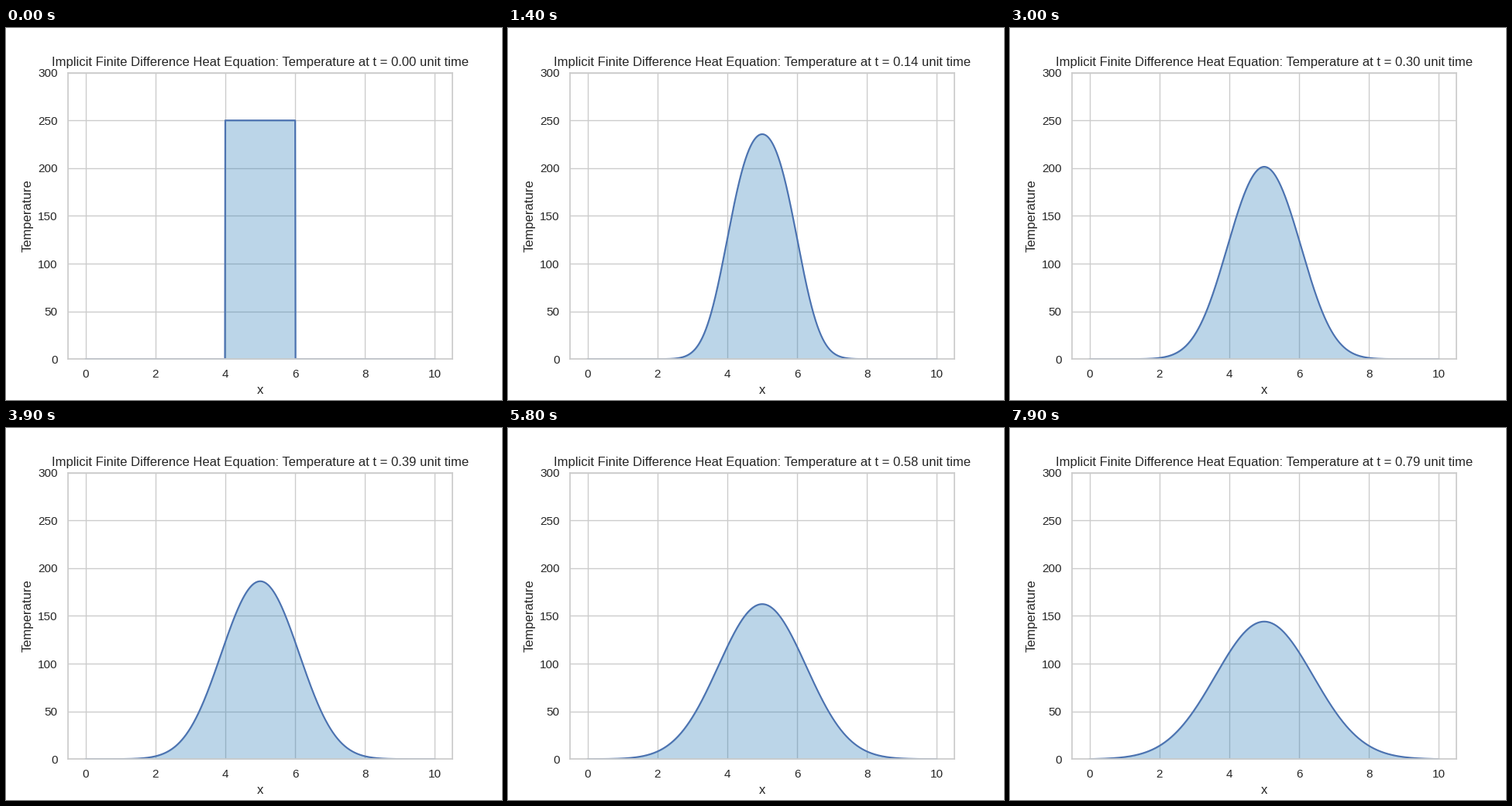
Recreate the animation shown at these times as a matplotlib script. Size 640 px wide and 480 px high, loop 8000 ms.

```python
import numpy as np
import matplotlib.pyplot as plt
from matplotlib.animation import FuncAnimation

INK, GRID = ".15", ".8"
plt.rcParams.update({
    "font.family": "sans-serif",
    "font.sans-serif": ["Liberation Sans", "DejaVu Sans"],
    "font.size": 12, "axes.titlesize": 12, "axes.labelsize": 12,
    "xtick.labelsize": 11, "ytick.labelsize": 11,
    "text.color": INK, "axes.labelcolor": INK,
    "xtick.color": INK, "ytick.color": INK,
    "axes.edgecolor": GRID, "axes.linewidth": 1.25, "axes.axisbelow": True,
    "axes.grid": True, "grid.color": GRID, "grid.linewidth": 1,
    "xtick.bottom": False, "ytick.left": False,
    "xtick.major.size": 6, "ytick.major.size": 6,
    "lines.linewidth": 1.5, "lines.solid_capstyle": "round",
    "patch.linewidth": 1,
})

FRAMES, INTERVAL = 80, 100
LENGTH, CELLS = 10, 1000
ALPHA, DT, STEPS = 1.0, 0.001, 10  # diffusivity, time step, steps per frame

x = np.linspace(0, LENGTH, CELLS + 1)
dx = LENGTH / CELLS


def solve():
    """Backward Euler with both ends held at zero."""
    r = ALPHA * DT / dx**2
    n = CELLS - 1
    matrix = (1 + 2 * r) * np.eye(n) - r * (np.eye(n, k=1) + np.eye(n, k=-1))
    step = np.linalg.matrix_power(np.linalg.inv(matrix), STEPS)
    u = np.where((x > 4 - dx / 2) & (x < 6 + dx / 2), 250.0, 0.0)
    states = [u]
    for _ in range(FRAMES - 1):
        u = u.copy()
        u[1:-1] = step @ u[1:-1]
        states.append(u)
    return states


def area(u):
    return [np.column_stack([np.r_[x, x[::-1]], np.r_[u, np.zeros_like(u)]])]


states = solve()

fig, ax = plt.subplots(figsize=(6.4, 4.8), dpi=100)
line, = ax.plot(x, states[0], color="#4c72b0")
fill = ax.fill_between(x, states[0], color="tab:blue", alpha=0.3)
ax.set_xlim(-0.5, 10.5)
ax.set_ylim(0, 300)
ax.set_xlabel("x")
ax.set_ylabel("Temperature")
title = ax.set_title("")


def update(i):
    line.set_ydata(states[i])
    fill.set_verts(area(states[i]))
    t = i * STEPS * DT
    title.set_text("Implicit Finite Difference Heat Equation: "
                   f"Temperature at t = {t:.2f} unit time")
    return line, fill, title


anim = FuncAnimation(fig, update, frames=FRAMES, interval=INTERVAL,
                     repeat=True, repeat_delay=0, blit=False)
plt.show()
```
